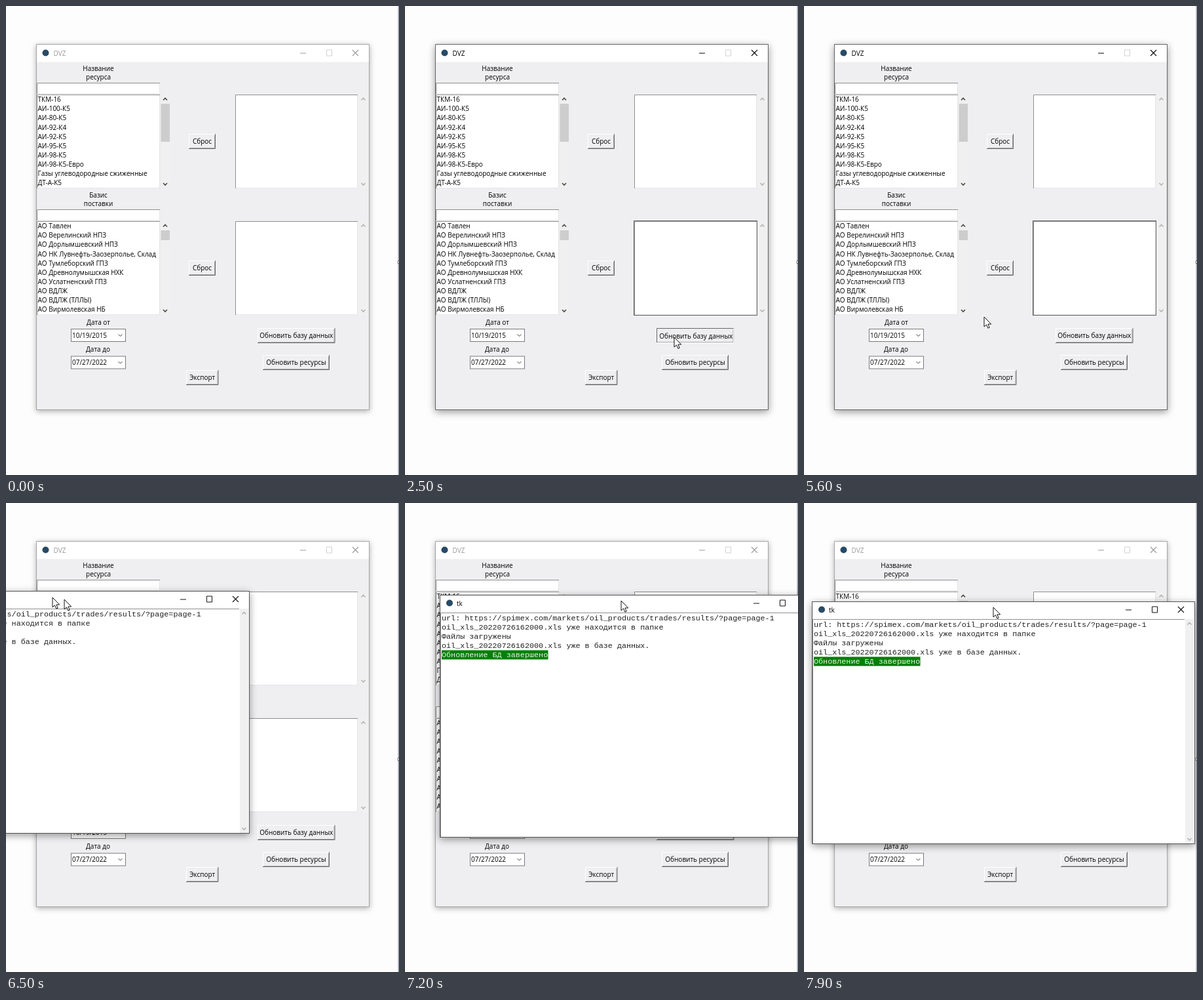
Animation, 600 px wide and 715 px high, one loop 8 s. Source, as an HTML page:

```html
<!DOCTYPE html>
<html lang="ru">
<head>
<meta charset="utf-8">
<title>Desktop form</title>
<style>
html, body { margin: 0; width: 100%; height: 100%; overflow: hidden; background: #fefdfe; }
svg { display: block; width: 100%; height: 100%; }
text { font: 10px "Open Sans", "Noto Sans", sans-serif; fill: #000; white-space: pre; }
.mid { text-anchor: middle; }
.mono { font: 11.76px "Liberation Mono", monospace; }
.soft { filter: drop-shadow(0 2px 4px rgba(0,0,0,.32)); }
.deep { filter: drop-shadow(0 3px 6px rgba(0,0,0,.4)); }
.active, .idle, .pressed, .pointer, .popup, .trail, .grip { animation: 8s step-end infinite; }
.active { animation-name: active; }
.idle { animation-name: idle; }
.pressed { animation-name: pressed; }
.pointer { animation-name: pointer; }
.popup { animation-name: drag; }
.grip { animation-name: grip; }
.trail { animation-name: trail; }
@keyframes active { 0%, 78.75% { opacity: 0 } 10% { opacity: 1 } 100% { opacity: 0 } }
@keyframes idle { 0%, 78.75% { opacity: 1 } 10% { opacity: 0 } 100% { opacity: 1 } }
@keyframes pressed { 0%, 48.75%, 100% { opacity: 0 } 30% { opacity: 1 } }
@keyframes trail { 0%, 82.5%, 100% { opacity: 0 } 81.25% { opacity: 1 } }
@keyframes grip {
  0%, 78.75% { transform: translate(284px, 10px) }
  82.5%, 100% { transform: translate(277px, 9px) }
}
@keyframes pointer {
  0% { transform: translate(-40px, 300px) }
  5% { transform: translate(530px, 330px); animation-timing-function: steps(9) }
  16.25% { transform: translate(445px, 432px); animation-timing-function: steps(4) }
  21.25% { transform: translate(417px, 493px); animation-timing-function: steps(4) }
  26.25% { transform: translate(412px, 503px) }
  27.5% { transform: translate(411px, 505px) }
  70% { transform: translate(275px, 474px) }
  71.25% { transform: translate(152px, 477px) }
  78.75%, 100% { transform: translate(-40px, 477px) }
}
@keyframes drag {
  0% { transform: translate(-700px, 130px) }
  78.75% { transform: translate(-300px, 131px); animation-timing-function: steps(2) }
  81.25% { transform: translate(-213px, 134px); animation-timing-function: steps(7) }
  90% { transform: translate(53px, 140px); animation-timing-function: steps(7) }
  98.75%, 100% { transform: translate(12px, 150px) }
}
</style>
</head>
<body>
<svg id="stage" viewBox="0 0 600 715" preserveAspectRatio="none"></svg>
<script>
const FACE = '#efeef0';
const rect = (x, y, w, h, fill, extra = '') =>
  `<rect x="${x}" y="${y}" width="${w}" height="${h}" fill="${fill}" ${extra}/>`;
const frame = (x, y, w, h, fill, stroke, extra = '') =>
  rect(x + .5, y + .5, w - 1, h - 1, fill, `stroke="${stroke}" ${extra}`);
const line = (d, color, width = 1) =>
  `<path d="${d}" fill="none" stroke="${color}" stroke-width="${width}"/>`;
const text = (x, y, s, cls = '', fill = '#000') =>
  `<text x="${x}" y="${y}" class="${cls}" style="fill:${fill}">${s}</text>`;
const group = (cls, body) => `<g class="${cls}">${body}</g>`;

const chevron = (x, y, dir, color, width = 1.6) =>
  line(`M${x - 3} ${y + 1.5 * dir}l3 ${-3 * dir}l3 ${3 * dir}`, color, width);

const sunken = (x, y, w, h) =>
  rect(x, y, w, h, '#fff') +
  line(`M${x + .5} ${y + h}V${y + .5}H${x + w}`, '#8f8f8f') +
  line(`M${x + w - .5} ${y + 1}V${y + h - .5}H${x + 1}`, '#e6e6e6');

const button = (x, y, w, h, label, down = false) => {
  const [light, dark] = down ? ['#696969', '#fff'] : ['#fff', '#696969'];
  const shift = down ? 1 : 0;
  return rect(x, y, w, h, FACE) +
    line(`M${x + .5} ${y + h}V${y + .5}H${x + w}`, light) +
    line(`M${x + w - 1.5} ${y + 2}V${y + h - 1.5}H${x + 1}`, '#a8a8a8') +
    line(`M${x + w - .5} ${y}V${y + h - .5}H${x}`, dark) +
    text(x + w / 2 + shift, y + h / 2 + 3.6 + shift, label, 'mid');
};

const scrollbar = (x, y, h, color, thumb = 0) =>
  rect(x, y, 13.5, h, '#f0f0f0') +
  (thumb ? rect(x, y + 14, 13.5, thumb, '#cdcdcd') : '') +
  chevron(x + 6.5, y + 7, 1, color) + chevron(x + 6.5, y + h - 6.5, -1, color);

const list = (y, rows, thumb) =>
  sunken(47, y, 188, 143) +
  rows.map((s, i) => text(48.5, y + 11.2 + i * 14.1, s)).join('') +
  scrollbar(236.5, y, 143, '#484848', thumb);

const combo = (y, value) =>
  frame(99, y, 84, 20, '#fff', '#7a7a7a') + text(101, y + 13.6, value) +
  chevron(174.5, y + 10, -1, '#444', 1);

// Window buttons; x is the left edge of the minimise bar, y its height
const controls = (x, y, color, maxColor) =>
  line(`M${x} ${y + .5}h9`, color) +
  line(`M${x + 40.5} ${y - 4.5}h8v9h-8z`, maxColor) +
  line(`M${x + 80} ${y - 4.5}l9 9m0 -9l-9 9`, color, 1.1);

const titleBar = (color, border, shadow) =>
  frame(46, 58, 509, 558, FACE, border, `class="${shadow}"`) +
  rect(47, 59, 507, 26.5, '#fff') +
  '<circle cx="60.5" cy="71.5" r="5" fill="#274a66"/>' +
  text(72.5, 75.5, 'DVZ', '', color) +
  controls(449, 71.5, color, '#d2d2d2');

const arrow = '<path d="M0 0V15L3.5 11.8L5.9 17.2L8.2 16.2L5.9 11H10.7Z" fill="#fff" stroke="#111"/>';

const resources = ['ТКМ-16', 'АИ-100-К5', 'АИ-80-К5', 'АИ-92-К4', 'АИ-92-К5', 'АИ-95-К5',
  'АИ-98-К5', 'АИ-98-К5-Евро', 'Газы углеводородные сжиженные', 'ДТ-А-К5'];
const depots = ['АО Тавлен', 'АО Верелинский НПЗ', 'АО Дорлымшевский НПЗ',
  'АО НК Лувнефть-Заозерполье, Склад', 'АО Тумлеборский ГПЗ', 'АО Древнолумышская НХК',
  'АО Услатненский ГПЗ', 'АО ВДЛЖ', 'АО ВДЛЖ (ТЛЛЫ)', 'АО Вирмолевская НБ'];
const log = ['url: https://spimex.com/markets/oil_products/trades/results/?page=page-1',
  'oil_xls_20220726162000.xls уже находится в папке', 'Файлы загружены',
  'oil_xls_20220726162000.xls уже в базе данных.', 'Обновление БД завершено'];

const label = (x, y, s) => text(x, y, s, 'mid');
const form =
  label(141, 99, 'Название') + label(141, 112, 'ресурса') +
  sunken(47, 117, 188, 17) + list(135, resources, 58) +
  label(141, 292, 'Базис') + label(141, 305, 'поставки') +
  sunken(47, 310, 188, 17) + list(328, depots, 15) +
  [135, 328].map(y => sunken(350, y, 187, 143) + scrollbar(539, y, 143, '#b4b4b4')).join('') +
  button(279, 195, 41, 23, 'Сброс') + button(279, 388, 41, 23, 'Сброс') +
  label(141, 485.5, 'Дата от') + combo(492, '10/19/2015') +
  label(140.5, 527, 'Дата до') + combo(533.5, '07/27/2022') +
  button(384, 491, 118.5, 23, 'Обновить базу данных') +
  button(392, 532, 102, 23, 'Обновить ресурсы') +
  button(275, 555, 49.5, 23, 'Экспорт');

const popup =
  frame(0, 0, 585, 370, '#fff', '#555', 'class="deep"') +
  '<circle cx="15" cy="12.5" r="5" fill="#274a66"/>' + text(26, 16.5, 'tk') +
  controls(479, 12.5, '#111', '#111') +
  line('M1.5 369V27.5H569', '#8f8f8f') + scrollbar(570, 27, 342, '#b4b4b4') +
  rect(3, 84.5, 162.5, 14, '#008000') +
  log.map((s, i) => text(3, 39 + i * 14.1, s, 'mono', i === 4 ? '#e8f2e8' : '#222')).join('') +
  group('trail', `<g transform="translate(302 13)">${arrow}</g>`) +
  group('grip', arrow);

document.getElementById('stage').innerHTML =
  rect(0, 0, 600, 715, '#fefdfe') +
  rect(598.5, 0, 1.5, 715, '#9aa3af') +
  frame(598, 388, 4, 5, '#fff', '#666') +
  group('idle', titleBar('#999', '#a6a6a6', 'soft')) +
  group('active', titleBar('#000', '#666', 'deep')) +
  form +
  group('active', frame(349, 327, 189, 145, 'none', '#646464')) +
  group('pressed', button(384, 491, 118.5, 23, 'Обновить базу данных', true)) +
  group('pointer', arrow) +
  group('popup', popup);
</script>
</body>
</html>
```
